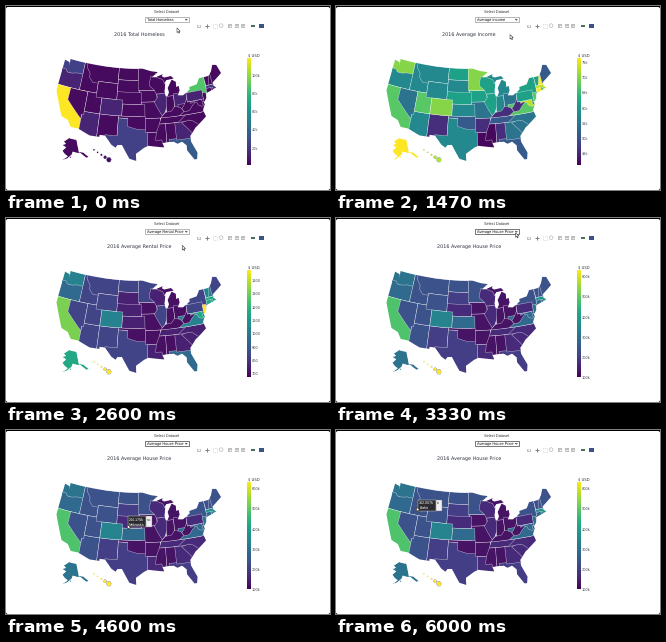
A matplotlib script for the animation above (6070 ms loop, 324 px wide and 184 px high).

```python
import numpy as np
import matplotlib.pyplot as plt
from matplotlib.animation import FuncAnimation
from matplotlib.collections import PolyCollection
from matplotlib.patches import Circle, FancyBboxPatch, Polygon, Rectangle
from matplotlib.path import Path

W, H, DPI = 324, 184, 100
FRAMES, LOOP_MS = 91, 6070
PX = 72 / DPI  # points per pixel

plt.rcParams["text.hinting"] = "none"
fig = plt.figure(figsize=(W / DPI, H / DPI), dpi=DPI, facecolor="black")
ax = fig.add_axes([0, 0, 1, 1])
ax.axis("off")


# ---------- composite Albers projection with Alaska and Hawaii insets ----------
def albers(par1, par2, meridian, center, scale, origin):
    s1, s2 = np.sin(np.radians([par1, par2]))
    n = (s1 + s2) / 2
    c = 1 - s1 ** 2 + 2 * n * s1

    def raw(west, lat):
        rho = np.sqrt(c - 2 * n * np.sin(np.radians(lat))) / n
        theta = n * np.radians(meridian - west)
        return np.array([rho * np.sin(theta), rho * np.cos(theta)])

    def project(flat, parts=6):
        """Flat list of west longitude, latitude; long edges follow the curve."""
        a = np.reshape(flat, (-1, 2))
        b = np.roll(a, -1, axis=0)
        t = np.arange(parts)[:, None] / parts
        pts = np.concatenate([p + (q - p) * t for p, q in zip(a, b)])
        return origin + scale * (raw(*pts.T) - raw(*center)[:, None]).T
    return project


K, CX, CY = 228, 132.7, 103.8
lower48 = albers(29.5, 45.5, 96, (96.6, 38.7), K, (CX, CY))
alaska = albers(55, 65, 154, (156, 58.5), 0.35 * K, (CX - 0.307 * K, CY + 0.201 * K))
hawaii = albers(8, 18, 157, (160, 19.9), K, (CX - 0.205 * K, CY + 0.212 * K))

# ---------- coast: the states below are painted in order and cut along it ----------
north = [124.7, 48.4, 122.8, 48.1, 122.5, 47.2, 122.8, 49, 95.2, 49, 92, 48.3, 89.6, 48,
         92, 46.7, 90.4, 46.7, 87.8, 47.4, 88.2, 46.9, 87.4, 46.5, 84.9, 46.7, 84, 46,
         86.7, 45.8, 88, 44.6, 87.2, 45, 87.8, 43, 87.5, 41.7, 86.8, 41.8, 86.2, 42.7,
         86.5, 43.8, 84.8, 45.8, 83.4, 45.1, 83.5, 43.8, 82.6, 44, 82.5, 42.8,
         83.4, 41.7, 81.6, 41.5, 79, 42.7, 79, 43.3, 76.3, 43.6, 75, 45, 71.5, 45]
east = [70.3, 45.9, 69.2, 47.4, 67.8, 47.1, 67, 44.8, 70.6, 43.2, 70.8, 42.3, 70, 41.7,
        73.8, 40.9, 74.1, 39.8, 74.9, 39, 75.5, 39.5, 75.1, 38.3, 76, 37, 75.5, 35.3,
        77.9, 33.9, 79.3, 33.1, 81.3, 31.2, 81.3, 29.8, 80, 26.8, 80.4, 25.2]
south = [81.1, 25.2, 82.8, 27.8, 82.7, 29, 83.9, 30.1, 85.3, 29.7, 86.3, 30.4, 89.6, 30.3,
         89.2, 29.1, 93.8, 29.7, 95, 29.2, 97.3, 27.7, 97.2, 25.9, 99.1, 26.4, 101.4, 29.8,
         102.7, 29.7, 103.2, 29, 104.5, 29.7, 106.5, 31.8, 108.2, 31.8, 108.2, 31.3, 111.1, 31.3]
west = [114.8, 32.5, 117.1, 32.5, 118.4, 34, 120.6, 34.6, 122.4, 37.4, 124.4, 40.4, 124.5, 42.8]
coast = Path(lower48(north + east + south + west))

codes, shapes = [], []


def state(code, *flat, proj=lower48):
    codes.append(code)
    shapes.append(proj(flat))


def block(code, left, right, bottom, top):
    state(code, left, top, right, top, right, bottom, left, bottom)


# west
block("WA", 125, 117, 45.5, 49)
state("OR", 125, 46.2, 123.2, 46.2, 122.7, 45.6, 121, 45.6, 119, 46, 116.9, 46, 117, 42, 125, 42)
block("ID", 117, 111, 42, 49)
state("MT", 116, 49, 104, 49, 104, 45, 111, 45, 111, 44.5, 113, 44.5, 114.4, 45.6, 114.5, 46.6, 116, 48)
block("CA", 125, 114.4, 32, 42)
block("AZ", 114.6, 109, 31, 37)
state("NV", 120, 42, 114, 42, 114, 36.1, 114.7, 36.1, 114.6, 35, 120, 39)
block("UT", 114, 109, 37, 42)
block("WY", 111, 104, 41, 45)
block("NM", 109, 103, 31, 37)

# plains
block("ND", 104, 96.7, 46, 49)
block("SD", 104, 96.5, 42.7, 46)
block("IA", 96.4, 90.3, 40.6, 43.5)
block("NE", 104, 95.7, 40, 43)
block("MO", 95.7, 89.1, 36.5, 40.6)
block("KS", 102, 94.6, 37, 40)
block("CO", 109, 102, 37, 41)
state("TX", 106.6, 32, 103, 32, 103, 36.5, 94, 36.5, 93.8, 25, 106.6, 25)
state("OK", 103, 37, 94.5, 37, 94.5, 33.7, 97, 33.8, 100, 34.5, 100, 36.5, 103, 36.5)
block("AR", 94.5, 89.8, 33, 36.5)
block("LA", 94, 88.8, 28, 33)

# lakes
block("MN", 96.8, 89, 43.5, 49.5)
block("MI", 90.5, 82, 41.7, 47.6)
state("WI", 92.2, 47, 92.8, 45.5, 92.8, 44.6, 91.2, 43.5, 90.6, 42.5, 87, 42.5, 86.8, 44.9, 87.5, 45.1, 88, 46, 90.4, 46.8)
block("IN", 87.6, 84.8, 37.7, 41.75)
block("OH", 84.8, 80.5, 38.2, 42.2)
state("IL", 91.4, 40.5, 90.2, 41.8, 90.6, 42.5, 87, 42.5, 87.5, 39, 88.1, 37.8, 89.1, 37, 90.2, 38.6)

# south
block("NC", 84.3, 75, 33.5, 36.6)
state("TN", 90.2, 35, 84.3, 35, 81.7, 36.6, 89.5, 36.6)
state("MS", 91.2, 33, 90.2, 35, 88.2, 35, 88.3, 30, 89.6, 30, 89.7, 31, 91.6, 31)
block("AL", 88.3, 85.2, 30, 35)
block("FL", 87.6, 79.5, 25, 31)
block("GA", 85.4, 80.5, 30.65, 35)
state("SC", 83.3, 34.8, 81, 35.2, 79.7, 34.8, 78, 33.5, 80.5, 31.8, 81.4, 32.9)
block("VA", 83.7, 75, 36.6, 39.4)
state("KY", 89.5, 36.5, 89.1, 37, 88, 37.8, 86, 38, 84.8, 39.1, 83, 38.6, 82, 37.5, 83.7, 36.6)
state("WV", 80.5, 40.6, 80.5, 39.7, 77.8, 39.5, 79.2, 38.5, 80.3, 37.5, 82, 37.4, 82.6, 38.3, 81.7, 39.1)

# north-east
state("MD", 79.5, 39.7, 75, 39.7, 75, 38, 76.2, 38, 77.2, 38.5, 77.3, 39, 78.4, 39.5, 79.5, 39.2)
block("DE", 75.7, 75, 38.4, 39.8)
block("NY", 80, 73.4, 40.4, 45.1)
block("PA", 80.5, 75, 39.7, 42)
block("NJ", 75.1, 73.9, 38.8, 41.2)
block("MA", 73.4, 69.8, 41.3, 42.75)
block("CT", 73.5, 71.8, 40.9, 42.05)
block("RI", 71.8, 71.2, 41.2, 42)
block("NH", 72.6, 70.7, 42.75, 45.3)
state("VT", 73.4, 45, 71.5, 45, 72.5, 42.75, 73.3, 42.75)
block("ME", 71, 66.5, 43, 47.6)

# insets
first_inset = len(shapes)
state("AK", 141, 69.6, 156.5, 71.3, 166.5, 68.3, 162, 66.8, 168, 65.6, 161, 64.3, 166, 61.6,
      162, 59.5, 157.5, 58, 164.8, 54.6, 158, 56.3, 151.7, 59.2, 150, 61.2, 144, 60, 139.5, 59.6,
      133, 54.9, 130, 55.3, 135, 59.5, 139, 60.3, 141, 60.3, proj=alaska)
state("AK", 154.7, 57.3, 153, 58.2, 152, 57.5, 153.8, 56.6, proj=alaska)
for t in np.linspace(0, 1, 5):  # island chain growing to the south-east
    angle = np.arange(6) * np.pi / 3
    size = 0.3 + 0.4 * t ** 3
    ring = np.column_stack([159.5 - 4 * t + size * np.cos(angle),
                            22 - 2.5 * t + size * np.sin(angle)])
    state("HI", *ring.ravel(), proj=hawaii)

paths = [Path(s) for s in shapes]
land = Path.make_compound_path(coast, *paths[first_inset:])


# ---------- data: colour level of each group of states ----------
def levels(default, groups):
    level = {c: v for v, names in groups.items() for c in names.split()}
    return plt.cm.viridis([level.get(c, default) for c in codes])


# title, low, high, ticks, unit, colours
DATASETS = [
    ("Total Homeless", 0.9, 118.1, range(20, 101, 20), "k", levels(0.03, {
        1: "CA", 0.73: "NY", 0.28: "FL", 0.19: "TX WA", 0.16: "MA",
        0.1: "OR PA GA CO IL OH AZ"})),
    ("Average Income", 41.1, 76.3, range(45, 76, 5), "k", levels(0.47, {
        1: "CT NH AK", 0.9: "MD MA HI", 0.82: "WA CO MN", 0.74: "CA UT VA NJ",
        0.57: "IL PA NY RI VT ND WI NE IA", 0.38: "OH GA SC NC MO NV",
        0.28: "TN OK FL ME", 0.13: "NM AR KY WV AL", 0.02: "LA MS"})),
    ("Average Rental Price", 680, 1480, range(700, 1401, 100), "", levels(0.2, {
        1: "HI NJ", 0.8: "CA", 0.6: "AK MA MD CT", 0.44: "WA CO NH RI DE VA VT",
        0.34: "OR FL", 0.09: "NE KS LA SD NC SC GA WI TN",
        0.04: "OK MO AR MS AL KY IN OH MI WV IA"})),
    ("Average House Price", 100, 630, range(100, 601, 100), "k", levels(0.25, {
        1: "HI", 0.72: "CA", 0.5: "MA", 0.45: "CO", 0.38: "WA AK NJ",
        0.34: "OR MD RI VA CT KS", 0.18: "NM TX FL SD",
        0.12: "NE IL WI PA TN NC SC GA LA",
        0.05: "IA MO AR OK MS AL KY IN OH MI WV"})),
]


# ---------- drawing helpers ----------
def text(x, y, s, size, color="#333333", ha="left", font="Liberation Sans", **kw):
    return ax.text(x, y, s, fontsize=size * PX, color=color, ha=ha,
                   va="center_baseline", family=font, **kw)


def box(x, y, w, h, fill="none", edge="none", lw=0.6, **kw):
    return ax.add_patch(Rectangle((x, y), w, h, fc=fill, ec=edge, lw=lw * PX, **kw))


def line(xs, ys, color="#b0b0b0", lw=0.7):
    ax.plot(xs, ys, color=color, lw=lw * PX, solid_capstyle="butt")


# ---------- page ----------
ax.add_patch(FancyBboxPatch((2, 3), W - 4, H - 5, fc="white", ec="none",
                            boxstyle="round,pad=2,rounding_size=2"))
text(161, 5.3, "Select Dataset", 3.85, ha="center")
select_box = box(138.7, 10.6, 44.6, 5.8, "white", "#888888")
select_text = text(140.6, 13.6, "", 3.85, "#111111")
line([179.3, 180.3, 181.3], [13, 14.2, 13], "#222222")
title = text(133, 28.4, "", 4.9, "#2f3540", "center", "DejaVu Sans")

# toolbar
GREY = "#b0b0b0"
box(191, 18.6, 4.4, 3, "#c4c4c4")
ax.add_patch(Circle((193.2, 20.1), 0.9, fc="white", ec="none"))
line([198.8, 203.4], [20, 20], "#808080", 1)
line([201.1, 201.1], [17.7, 22.3], "#808080", 1)
box(206.5, 18, 4, 4, edge=GREY, ls=":")
ax.add_patch(Circle((215.2, 19.6), 1.8, fc="none", ec=GREY, lw=0.6 * PX))
for cx in (224, 230.5, 237):
    box(cx - 2, 18, 4, 4, "#bdbdbd")
    line([cx - 1.3, cx + 1.3], [20, 20], "white")
line([224, 224], [18.7, 21.3], "white")
box(244.8, 18.8, 4.4, 2.2, "#4d6b5e")
box(253.3, 17.5, 4.6, 4.6, "#3b5488")

# map
states = PolyCollection(shapes, edgecolors=(1, 1, 1, 0.65), linewidths=0.45 * PX)
ax.add_collection(states, autolim=False)

# colour bar
TOP, BOTTOM = 52.5, 159.5
ax.imshow(np.linspace(1, 0, 256)[:, None], cmap="viridis", aspect="auto", zorder=2,
          extent=(241, 245, BOTTOM, TOP), interpolation="bilinear")
ax.set_xlim(0, W)
ax.set_ylim(H, 0)
states.set_clip_path(land, ax.transData)
text(241.6, 48.8, "$ USD", 3.8, "#2f3540", font="DejaVu Sans")
tick_sets = [[text(245.8, BOTTOM - (t - low) / (high - low) * (BOTTOM - TOP),
                   f"{t}{unit}", 3.5, "#444c58", font="DejaVu Sans") for t in ticks]
             for _, low, high, ticks, unit, _ in DATASETS]

# hover label: value, name and anchor
TIPS = {"IA": ("137.518k", "Iowa", 140, 91.5),
        "NE": ("244.175k", "Nebraska", 121.5, 91.8),
        "CO": ("341.386k", "Colorado", 105, 99.5),
        "UT": ("299.695k", "Utah", 87, 97),
        "ID": ("302.057k", "Idaho", 81.8, 75)}
TIP_W, TIP_H = 18, 11
tip_main = box(0, 0, TIP_W, TIP_H, "#2b2b2f", "#e8e8e8", 0.4, zorder=5)
tip_side = box(0, 0, 6.5, TIP_H, "#f0f0f0", "#77777c", 0.4, zorder=5)
tip_value, tip_name = (text(0, 0, "", 3.6, "white", zorder=6) for _ in range(2))
tip_code = text(0, 0, "", 3.2, "#333333", zorder=6)
tip = [tip_main, tip_side, tip_value, tip_name, tip_code]

ARROW = np.array([(0, 0), (0, 4.6), (1.1, 3.6), (1.9, 5.2), (2.6, 4.8),
                  (1.9, 3.3), (3.3, 3.2)])
cursor = ax.add_patch(Polygon(ARROW, fc="white", ec="#222222", lw=0.5 * PX, zorder=9))

# cursor: resting place, then moves as start step, end step, x, y
START = (171, 22)
MENU = (180, 13)
MOVES = [(10, 17, *MENU), (20, 22, 174, 28.5), (27, 33, *MENU), (35, 39, 175.5, 30),
         (45, 50, *MENU), (53, 65, 121.5, 94.5), (69, 76, 82, 99.5), (84, 87, 80.5, 77)]
CLICKS = [1, 25, 43]


def cursor_at(step):
    pos = np.array(START, float)
    for begin, end, *goal in MOVES:
        t = np.clip((step - begin) / (end - begin), 0, 1)
        pos += (goal - pos) * t * t * (3 - 2 * t)
    return pos


def show_tip(point):
    under = [c for c, p in zip(codes, paths) if p.contains_point(point)]
    code = under[-1] if under else None
    for part in tip:
        part.set_visible(code in TIPS)
    if code not in TIPS:
        return
    value, name, left, mid = TIPS[code]
    tip_main.set_xy((left, mid - TIP_H / 2))
    tip_side.set_xy((left + TIP_W, mid - TIP_H / 2))
    for label, s, dx, dy in ((tip_value, value, 1.4, -2.4), (tip_name, name, 1.4, 2.4),
                             (tip_code, code, TIP_W + 1, -2.2)):
        label.set_text(s)
        label.set_position((left + dx, mid + dy))


def update(step):
    chosen = sum(step >= c for c in CLICKS)
    shown = sum(step > c for c in CLICKS)
    select_text.set_text(DATASETS[chosen][0])
    select_box.set_edgecolor("#222222" if chosen == 3 else "#888888")
    title.set_text("2016 " + DATASETS[shown][0])
    states.set_facecolor(DATASETS[shown][-1])
    for i, labels in enumerate(tick_sets):
        for label in labels:
            label.set_visible(i == shown)
    point = cursor_at(step)
    cursor.set_xy(ARROW + point)
    show_tip(point)
    return []


update(0)
anim = FuncAnimation(fig, update, frames=FRAMES, interval=LOOP_MS / FRAMES,
                     init_func=lambda: update(0), repeat=True, repeat_delay=0)
plt.show()
```
